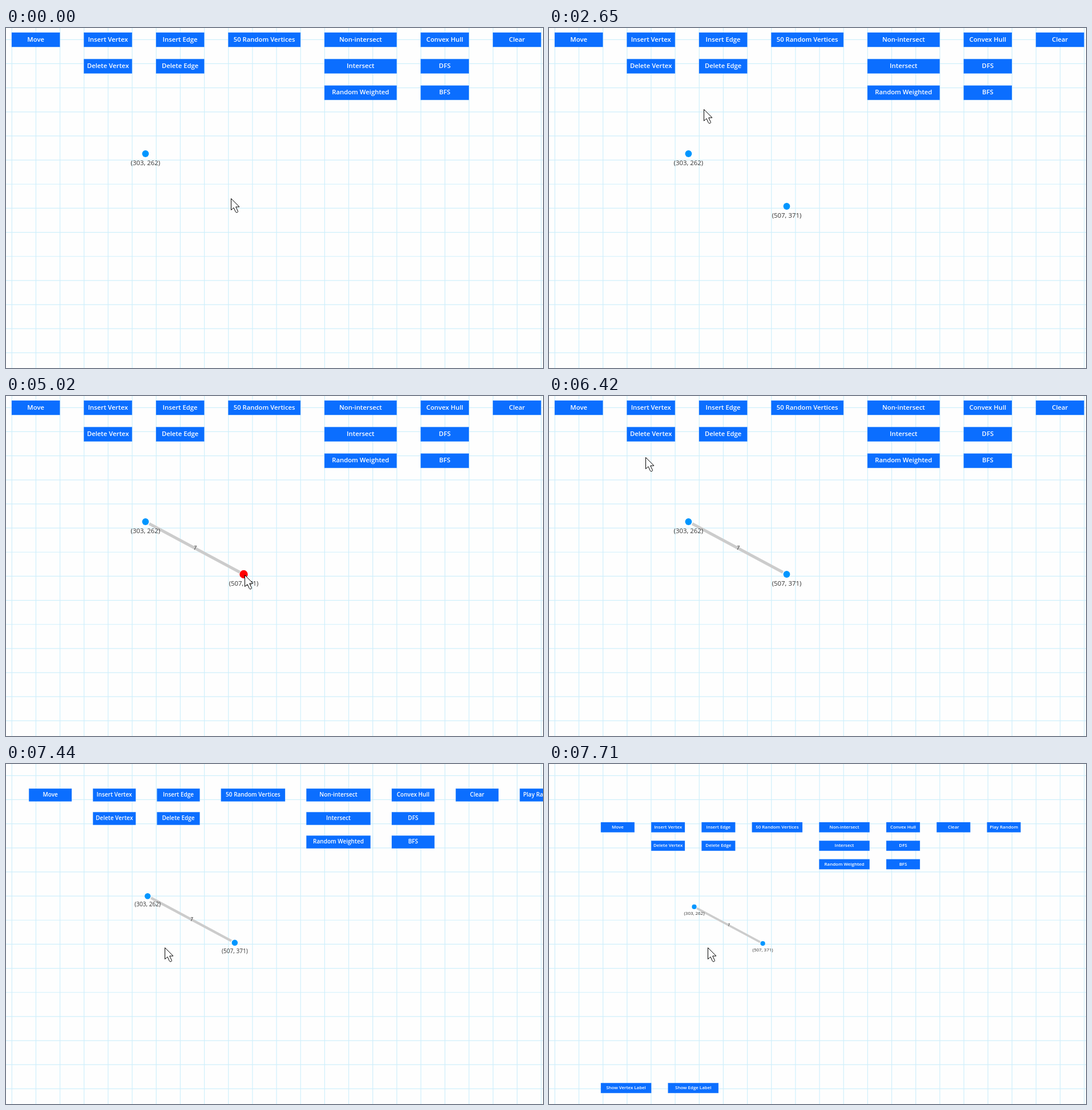
An HTML page with a canvas that plays this animation: 941 px wide and 595 px high, repeating every 8 s.

```html
<!DOCTYPE html>
<html lang="en">
<head>
<meta charset="utf-8">
<title>Graph editor</title>
<style>
html, body { margin: 0; width: 100%; height: 100%; overflow: hidden; background: #fefefe; }
canvas { display: block; }
</style>
</head>
<body>
<canvas id="stage" width="941" height="595"></canvas>
<script>
const ctx = document.getElementById('stage').getContext('2d');
const LOOP = 8000, CELL = 42.16, LEFT = 10, TOP = 8;
const BLUE = '#0b6eff', HOVER = '#0b5ed7', GRID = '#cfeffb';
const FONT = '"Open Sans", "Noto Sans", sans-serif';
const ZOOM_AT = { x: 277.8, y: 319 };
const A = { x: 244.4, y: 220, label: '(303, 262)' };
const B = { x: 416.5, y: 312, label: '(507, 371)' };

// Columns sit one cell apart; long labels make a column wider
function layout(columns, firstRow) {
  let x = LEFT;
  return columns.flatMap(labels => {
    const w = CELL * (labels.some(l => l.length > 13) ? 3 : 2);
    const column = labels.map((label, i) => ({
      label, x, w, y: TOP + (firstRow + i) * CELL * 1.1, h: CELL * 0.595
    }));
    x += w + CELL;
    return column;
  });
}

const buttons = [
  ...layout([
    ['Move'], ['Insert Vertex', 'Delete Vertex'], ['Insert Edge', 'Delete Edge'],
    ['50 Random Vertices'], ['Non-intersect', 'Intersect', 'Random Weighted'],
    ['Convex Hull', 'DFS', 'BFS'], ['Clear'], ['Play Random']
  ], 0),
  ...layout([['Show Vertex Label'], ['Show Edge Label']], 14.1)
];

const smooth = u => u * u * (3 - 2 * u);
const easeOut = u => 1 - (1 - u) ** 3;

// Each move runs in n steps to a point, its path bent away from the straight line
const moves = [
  { at: 120, step: 130, n: 1, to: [418, 313] },
  { at: 1070, step: 130, n: 8, to: [309, 16.5], ease: easeOut },
  { at: 2260, step: 130, n: 7, to: [247, 223] },
  { at: 3320, step: 144, n: 6, to: [423, 317], bend: [-2, 17] },
  { at: 4760, step: 130, n: 3, to: [418, 313] },
  { at: 5580, step: 137, n: 10, to: [58, 18], bend: [98, 75] },
  { at: 6920, step: 130, n: 4, to: [278, 321] }
];

function pointerAt(t) {
  let pos = [394, 298];
  for (const { at, step, n, to, bend = [0, 0], ease = smooth } of moves) {
    if (t < at) break;
    const e = ease(Math.min(1, (Math.floor((t - at) / step) + 1) / n));
    pos = pos.map((from, i) => from + (to[i] - from) * e + 2 * e * (1 - e) * bend[i]);
  }
  return { x: Math.round(pos[0]), y: Math.round(pos[1]) };
}

function zoomAt(t) {
  const clicks = [7440, 7560, 7710].filter(c => t >= c).length;
  return 0.887 ** clicks;
}

function line(x1, y1, x2, y2, color, width, cap = 'butt') {
  ctx.strokeStyle = color;
  ctx.lineWidth = width;
  ctx.lineCap = cap;
  ctx.beginPath();
  ctx.moveTo(x1, y1);
  ctx.lineTo(x2, y2);
  ctx.stroke();
}

function text(label, x, y, color, style) {
  ctx.font = style + ' ' + FONT;
  ctx.fillStyle = color;
  ctx.textAlign = 'center';
  ctx.fillText(label, x, y);
}

function drawGrid() {
  ctx.fillStyle = '#fefefe';
  ctx.fillRect(0, 0, 941, 595);
  for (let x = LEFT + 0.3; x < 941; x += CELL) line(x, 0, x, 595, GRID, 1.2);
  for (let y = 20.3; y < 595; y += CELL) line(0, y, 941, y, GRID, 1.2);
}

function drawButton(b, p) {
  const over = p.x > b.x && p.x < b.x + b.w && p.y > b.y && p.y < b.y + b.h;
  ctx.strokeStyle = 'rgba(120, 190, 255, 0.5)';
  ctx.lineWidth = 1;
  ctx.strokeRect(b.x, b.y, b.w, b.h);
  ctx.fillStyle = over ? HOVER : BLUE;
  ctx.fillRect(b.x, b.y, b.w, b.h);
  text(b.label, b.x + b.w / 2, b.y + 15.6, '#fff', '600 11.3px');
}

function drawVertex(v, p, canHover) {
  const hot = canHover && Math.hypot(p.x - v.x, p.y - v.y) < 9;
  ctx.fillStyle = hot ? '#f00' : '#0096ff';
  ctx.beginPath();
  ctx.arc(v.x, v.y, hot ? 7.2 : 5.9, 0, 7);
  ctx.fill();
  text(v.label, v.x, v.y + 20, '#333', '11.4px');
}

function drawEdge() {
  const dx = B.x - A.x, dy = B.y - A.y, gap = 7.5 / Math.hypot(dx, dy);
  line(A.x + dx * gap, A.y + dy * gap, B.x - dx * gap, B.y - dy * gap, '#ccc', 5);
  text('7', A.x + dx / 2 + 0.8, A.y + dy / 2 + 3, '#222', 'italic 9.5px');
}

const arrow = new Path2D('M.5 .5V20.5L5 16.5L8.4 23.8Q9.2 25.6 11.3 24.7Q13 24 12.2 22.2L8.7 15H15Z');

function drawPointer(p) {
  ctx.save();
  ctx.translate(p.x, p.y);
  ctx.fillStyle = '#fff';
  ctx.strokeStyle = '#000';
  ctx.lineWidth = 1;
  ctx.fill(arrow);
  ctx.stroke(arrow);
  ctx.restore();
}

function draw(t) {
  const p = pointerAt(t), s = zoomAt(t);
  const toWorld = k => ZOOM_AT[k] + (p[k] - ZOOM_AT[k]) / s;
  const w = { x: toWorld('x'), y: toWorld('y') };

  drawGrid();
  ctx.save();
  ctx.translate(ZOOM_AT.x * (1 - s), ZOOM_AT.y * (1 - s));
  ctx.scale(s, s);
  buttons.forEach(b => drawButton(b, w));
  if (t >= 4630) drawEdge();
  drawVertex(A, w, true);
  if (t >= 420) drawVertex(B, w, t >= 540);
  if (t >= 3320 && t < 4630) line(A.x, A.y, p.x, p.y - 0.5, '#00ff32', 5, 'round');
  ctx.restore();
  drawPointer(p);
}

const begin = performance.now();
function tick() {
  draw((performance.now() - begin) % LOOP);
  requestAnimationFrame(tick);
}
tick();
</script>
</body>
</html>
```
